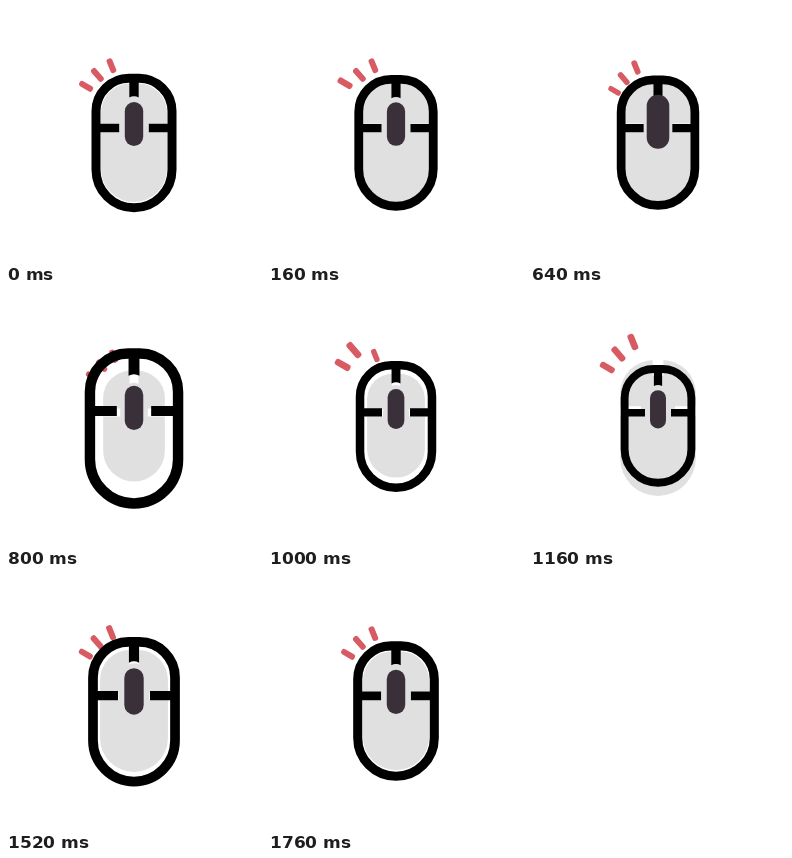
These frames come from a looping animation (256 by 256 pixels, 1.8 s). An HTML page:

```html
<!DOCTYPE html>
<html lang="en">
<head>
<meta charset="utf-8">
<title>Mouse click</title>
<style>
  html, body { margin: 0; width: 100%; height: 100%; overflow: hidden; background: #fff; }
  svg { display: block; width: 100vw; height: 100vh; }
</style>
</head>
<body>
<svg viewBox="0 0 256 256">
  <defs>
    <path id="seams" d="M123.3 73H132.7V91.6Q128 89 123.3 91.6ZM91 117.7H113.2V126.3H91ZM142.8 117.7H165V126.3H142.8Z"/>
  </defs>
  <g fill="#d85b64">
    <g data-delay="0"><rect x="-7.5" y="-3" width="15" height="6" rx="2.4" transform="translate(80.1 80.3) rotate(30)"/></g>
    <g data-delay="80"><rect x="-8" y="-3" width="16" height="6" rx="2.4" transform="translate(91.4 68.9) rotate(49)"/></g>
    <g data-delay="160"><rect x="-7.5" y="-3" width="15" height="6" rx="2.4" transform="translate(105.4 59.7) rotate(68)"/></g>
  </g>
  <g data-delay="240">
    <path d="M95 106.5A29 29 0 0 1 124 77.5H132A29 29 0 0 1 161 106.5V163A33 33 0 0 1 95 163Z" fill="#e0e0e0"/>
    <use href="#seams" fill="#fff"/>
  </g>
  <g data-delay="520">
    <path d="M90 105.3A33 33 0 0 1 123 72.3H133A33 33 0 0 1 166 105.3V163.7A38 38 0 0 1 90 163.7Z" fill="none" stroke="#000" stroke-width="9"/>
    <use href="#seams"/>
  </g>
  <rect data-delay="400" x="118.8" y="96" width="18.4" height="44" rx="9.2" fill="#393039"/>
</svg>
<script>
const LOOP = 1800;

const smooth = u => u * u * (3 - 2 * u);
const sineOut = u => Math.sin(u * Math.PI / 2);
const cubicOut = u => 1 - (1 - u) ** 3;

// Each move eases the scale to a new value and ends at the given time in ms
const moves = [
  { end: 120, scale: 1, ease: smooth },
  { end: 240, scale: 1.245, ease: smooth },
  { end: 365, scale: 1.04, ease: smooth },
  { end: 815, scale: 0.876, ease: sineOut },
  { end: 920, scale: 1.15, ease: smooth },
  { end: LOOP, scale: 1, ease: cubicOut }
];

function scaleAt(time) {
  const t = ((time % LOOP) + LOOP) % LOOP;
  const i = moves.findIndex(move => t < move.end);
  const from = moves[i - 1] ?? { end: 0, scale: 1 };
  const { end, scale, ease } = moves[i];
  return from.scale + (scale - from.scale) * ease((t - from.end) / (end - from.end));
}

// All layers follow the same pulse, each with its own delay
const layers = [...document.querySelectorAll("[data-delay]")].map(node => {
  const delay = Number(node.dataset.delay);
  return { node, delay, rest: scaleAt(-delay) };
});

function draw(time) {
  for (const { node, delay, rest } of layers) {
    const s = scaleAt(time - delay) / rest;
    node.setAttribute("transform", `translate(128 128) scale(${s}) translate(-128 -128)`);
  }
}

let start;
function tick(now) {
  start ??= now;
  draw((now - start) % LOOP);
  requestAnimationFrame(tick);
}
draw(0);
requestAnimationFrame(tick);
</script>
</body>
</html>
```
